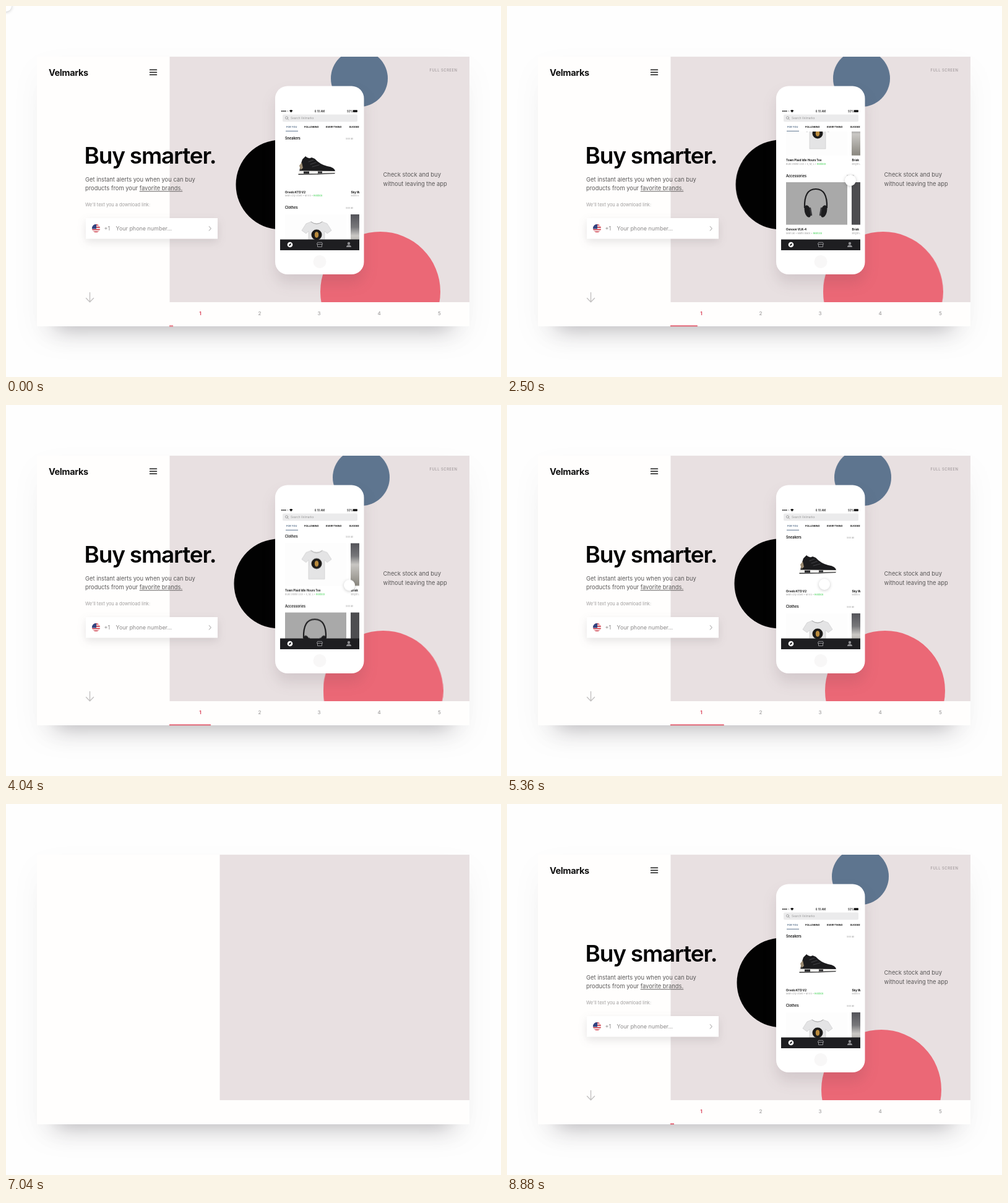
Write an HTML page that moves like this. It is 800 px wide and 600 px high and loops after 8.9 s.

```html
<!DOCTYPE html>
<html lang="en">
<head>
<meta charset="utf-8">
<title>Velmarks</title>
<style>
html, body { margin: 0; width: 100%; height: 100%; overflow: hidden; background: #fefefe; }
.card {
  position: absolute; left: 50px; top: 82px; width: 699px; height: 436px; background: #fffefd;
  box-shadow: 0 34px 34px -30px rgba(50, 45, 55, .34), 0 20px 50px rgba(60, 55, 60, .04);
}
svg { position: absolute; left: 0; top: 0; width: 800px; height: 600px; }
text { font-family: Inter, "Open Sans", sans-serif; fill: #111; white-space: pre; }

/* Shared 8.9 s loop; --d staggers the entrances, --dy sets their travel. */
.stage, .panel, .bar, .drift, .pop, .early, .late, .scroll, .touch {
  animation: 8.9s linear var(--d, 0s) infinite;
}
.stage { animation-name: stage; }
.panel { animation-name: panel; transform-origin: 749px 0; }
.bar { animation-name: bar; transform-origin: 264px 0; }
.drift { animation-name: drift; }
.pop { animation-name: pop; transform-box: fill-box; transform-origin: center; }
.early { animation-name: early; }
.late { animation-name: late; }
.scroll { animation-name: scroll; }
.touch { animation-name: touch; }
.scroll, .touch { animation-timing-function: cubic-bezier(.37, 0, .63, 1); }

@keyframes stage {
  0%, 60.5% { opacity: 1; }
  68.3%, 74.5% { opacity: 0; }
  74.6%, 100% { opacity: 1; }
}
@keyframes panel {
  0%, 68.4% { transform: none; }
  68.5% { transform: scaleX(0); }
  74.6% { transform: scaleX(0); animation-timing-function: cubic-bezier(.215, .61, .355, 1); }
  84.8%, 100% { transform: none; }
}
@keyframes bar {
  0% { transform: scaleX(.063); }
  68.3% { transform: scaleX(.975); }
  68.4%, 95.4% { transform: scaleX(0); }
  100% { transform: scaleX(.063); }
}
@keyframes drift {
  0% { transform: none; }
  68.4% { transform: translateX(var(--dx)); }
  68.5%, 100% { transform: none; }
}
@keyframes pop {
  0%, 68.4% { transform: none; }
  68.5% { transform: scale(0); }
  80.5% { transform: scale(0); animation-timing-function: cubic-bezier(.2, .7, .2, 1); }
  89.5%, 100% { transform: none; }
}
@keyframes early {
  0%, 68.4% { transform: none; opacity: 1; }
  68.5% { transform: translateY(var(--dy, 12px)); opacity: 0; }
  80.9% { transform: translateY(var(--dy, 12px)); opacity: 0; animation-timing-function: cubic-bezier(.215, .61, .355, 1); }
  88%, 100% { transform: none; opacity: 1; }
}
@keyframes late {
  0%, 68.4% { transform: none; opacity: 1; }
  68.5% { transform: translateY(var(--dy, 4px)); opacity: 0; }
  87.6% { transform: translateY(var(--dy, 4px)); opacity: 0; animation-timing-function: cubic-bezier(.215, .61, .355, 1); }
  94.4%, 100% { transform: none; opacity: 1; }
}
@keyframes scroll {
  0%, 6.74% { transform: translateY(0); }
  15.2%, 22.47% { transform: translateY(-112px); }
  30.73%, 38.2% { transform: translateY(-224px); }
  49.33%, 100% { transform: translateY(0); }
}
@keyframes touch {
  0%, 5.6% { transform: translate(555px, 372px); opacity: 0; }
  6.74% { transform: translate(555px, 372px); opacity: 1; }
  15.2% { transform: translate(555px, 260px); opacity: 1; }
  16.3% { transform: translate(555px, 260px); opacity: 0; }
  21.35% { transform: translate(555px, 334px); opacity: 0; }
  22.47% { transform: translate(555px, 334px); opacity: 1; }
  30.73% { transform: translate(555px, 222px); opacity: 1; }
  31.8% { transform: translate(555px, 222px); opacity: 0; }
  37.08% { transform: translate(555px, 245px); opacity: 0; }
  38.2% { transform: translate(555px, 245px); opacity: 1; }
  49.33% { transform: translate(555px, 339px); opacity: 1; }
  50.4% { transform: translate(555px, 339px); opacity: 0; }
  54.5% { transform: translate(545px, 325px); opacity: 0; }
  58.5%, 66% { transform: translate(513px, 290px); opacity: 1; }
  68.4%, 100% { transform: translate(513px, 290px); opacity: 0; }
}

.logo { font-size: 14.5px; font-weight: 700; letter-spacing: -.4px; }
.title { font-size: 37px; font-weight: 600; letter-spacing: -1.2px; fill: #050505; }
.copy text { font-size: 9.4px; fill: #5b5959; }
.copy .link { text-decoration: underline; }
.hint { font-size: 7.35px; fill: #a09e9e; }
.field { font-size: 8.95px; fill: #8b8989; }
.small { font-size: 5.9px; letter-spacing: .5px; fill: #a39c9e; font-weight: 500; }
.nums text { font-size: 8px; font-weight: 500; fill: #a09e9e; text-anchor: middle; }
.nums .on { fill: #dc4a5f; font-weight: 700; }
.status text { font-size: 4.2px; font-weight: 500; }
.search { font-size: 4.7px; fill: #999; }
.tabs text { font-size: 3.9px; font-weight: 700; }
.tabs .on { fill: #5e758f; }
.head { font-size: 5.5px; font-weight: 600; }
.name { font-size: 4.6px; font-weight: 700; }
.all, .sub { font-size: 3.8px; fill: #9d9d9d; }
.sub .new { fill: #35d04a; }
.shadow { filter: drop-shadow(0 14px 11px rgba(70, 50, 60, .13)); }
.lift { filter: drop-shadow(0 5px 7px rgba(60, 55, 60, .13)); }
.knob { filter: drop-shadow(0 1.5px 2.5px rgba(0, 0, 0, .22)); }
.line { fill: none; stroke-linecap: round; stroke-linejoin: round; }
</style>
</head>
<body>
<div class="card"></div>
<svg viewBox="0 0 800 600">
  <defs>
    <clipPath id="area"><rect x="264.5" y="82" width="484.5" height="397"/></clipPath>
    <clipPath id="screen"><rect x="443" y="165" width="128" height="230"/></clipPath>
    <clipPath id="feed"><rect x="443" y="203.5" width="128" height="174.5"/></clipPath>
    <clipPath id="round"><circle cx="145.5" cy="359.7" r="6.6"/></clipPath>
    <linearGradient id="coat" x2="0" y2="1">
      <stop stop-color="#54545a"/><stop offset=".3" stop-color="#77777a"/>
      <stop offset=".5" stop-color="#c9c7c4"/><stop offset="1" stop-color="#8a877f"/>
    </linearGradient>
  </defs>

  <g class="stage">
    <rect class="panel" x="264.5" y="82" width="484.5" height="397" fill="#e8e0e1"/>

    <g clip-path="url(#area)">
      <g class="drift" style="--dx:4.6px"><circle class="pop" cx="571" cy="117" r="46" fill="#5e758f"/></g>
      <g class="drift" style="--dx:-4.6px"><circle class="pop" style="--d:.1s" cx="444" cy="289" r="72.5" fill="#020202"/></g>
      <g class="drift" style="--dx:6.8px"><circle class="pop" style="--d:.2s" cx="605" cy="462" r="97" fill="#eb6876"/></g>
    </g>

    <g class="early" style="--d:.15s;--dy:36px">
      <rect class="shadow" x="435" y="129.5" width="143.5" height="304.5" rx="20" fill="#fff"/>
      <circle cx="507" cy="413.5" r="10.5" fill="#f8f7f7"/>
      <g clip-path="url(#screen)">
        <g class="status">
          <g fill="#111">
            <circle cx="446" cy="170" r="1"/><circle cx="448.6" cy="170" r="1"/><circle cx="451.2" cy="170" r="1"/>
            <path d="M458 169.2q2.7-2.4 5.4 0l-2.7 3z"/>
            <rect x="560.5" y="168.3" width="7.4" height="3.5" rx=".7"/>
          </g>
          <path class="line" d="M453.4 170h.1m2 0h.1" stroke="#aaa" stroke-width="1.6"/>
          <text x="507" y="171.6" text-anchor="middle">6:10 AM</text>
          <text x="551" y="171.6">92%</text>
        </g>
        <rect x="447" y="175.5" width="121" height="11.7" rx="2" fill="#ebebec"/>
        <g class="line" stroke="#888" stroke-width=".7"><circle cx="453.5" cy="180.8" r="2"/><path d="M455 182.4l1.6 1.6"/></g>
        <text class="search" x="460" y="183">Search Velmarks</text>
        <g class="tabs">
          <text class="on" x="453" y="197">FOR YOU</text><text x="482" y="197">FOLLOWING</text>
          <text x="517" y="197">EVERYTHING</text><text x="554.5" y="197">SUGGESTED</text>
        </g>
        <rect x="452" y="201.8" width="20" height="1" fill="#5e758f"/>

        <g clip-path="url(#feed)">
          <g class="scroll">
            <text class="head" x="451" y="216.3">Sneakers</text><text class="all" x="549" y="215.7">See all</text>
            <path d="M474 268q1-10 5-20l5-5q5 5 10 2l5 2q8 9 20 12 13 2 13 9z" fill="#1b1b1d"/>
            <path d="M474 258l4-5 2 9-4 3z" fill="#9b8b72"/>
            <path class="line" d="M489 252l8-3m-5 7l9-3m-6 7l11-3" stroke="#55555a" stroke-width=".7"/>
            <path d="M473 266.5l59 .5q2 2-1 3.5l-59 1z" fill="#f2f1ef"/>
            <path class="line" d="M473 272.2l30-.4 28-1.2" stroke="#333" stroke-width="1.4"/>
            <path d="M481 267.5h9v3.5h-9zm23 0h7v3h-7z" fill="#2a2a2c"/>
            <text class="name" x="451" y="302.7">Orvelo KTD V2</text><text class="name" x="557.5" y="302.7">Sky Wo</text>
            <text class="sub" x="451" y="308.4">Main City Store • M 9.5 • <tspan class="new">Restock</tspan></text>
            <text class="sub" x="557.5" y="308.4">Extra 5</text>

            <text class="head" x="451" y="328.4">Clothes</text><text class="all" x="549" y="327.8">See all</text>
            <rect x="451" y="337" width="99" height="68.7" fill="#fdfdfd"/>
            <rect x="557" y="337" width="30" height="68.7" fill="url(#coat)"/>
            <path d="M493 349q9 6 18 0l8 3 7 11-7 5-4-4v31h-26v-31l-4 4-7-5 7-11z" fill="#e4e4e5" stroke="#c6c6c8" stroke-width=".6"/>
            <path class="line" d="M493 349q9 7 18 0" stroke="#aaa" stroke-width="1"/>
            <circle cx="502" cy="370" r="8.5" fill="#1c1b1a"/>
            <ellipse cx="502" cy="370" rx="3.2" ry="4.8" fill="#b98a3c"/>
            <text class="name" x="451" y="415.2">Town Plaid Idle Hours Tee</text><text class="name" x="557.5" y="415.2">Brisk</text>
            <text class="sub" x="451" y="420.8">Bulk Online USA • S, M, L • <tspan class="new">Restock</tspan></text>
            <text class="sub" x="557.5" y="420.8">Bright L</text>

            <text class="head" x="451" y="440.9">Accessories</text><text class="all" x="549" y="440.3">See all</text>
            <rect x="451" y="449" width="99" height="68.7" fill="#a9a9a9"/>
            <rect x="557" y="449" width="30" height="68.7" fill="#4d4d50"/>
            <path class="line" d="M481 490q-1-30 18-30t18 30" stroke="#1d1d1f" stroke-width="2.2"/>
            <g fill="#1d1d1f">
              <ellipse cx="486" cy="496" rx="5" ry="10" transform="rotate(-14 486 496)"/>
              <ellipse cx="512" cy="496" rx="5" ry="10" transform="rotate(14 512 496)"/>
            </g>
            <path class="line" d="M490 491l2 11m16-11l-2 11" stroke="#3b3b3e" stroke-width="2.4"/>
            <text class="name" x="451" y="527">Oonoon VLK-4</text><text class="name" x="557.5" y="527">Brisk</text>
            <text class="sub" x="451" y="532.6">Main.uk • Matte black • <tspan class="new">Restock</tspan></text>
            <text class="sub" x="557.5" y="532.6">Bright L</text>

            <text class="head" x="451" y="552.6">Hats</text><text class="all" x="549" y="552">See all</text>
            <rect x="451" y="561" width="99" height="68.7" fill="#d9d9d9"/>
            <rect x="557" y="561" width="30" height="68.7" fill="#e5e5e5"/>
          </g>
        </g>

        <rect x="443" y="377.5" width="128" height="17.5" fill="#1e1e21"/>
        <circle cx="459" cy="386" r="4.3" fill="#fff"/>
        <path d="M461.2 383.8l-1.3 3.1-3.1 1.3 1.3-3.1z" fill="#1e1e21"/>
        <path class="line" d="M503.5 385.5v4h7v-4m-8-.5l1-2.7h7l1 2.7z" stroke="#8d8d90" stroke-width="1"/>
        <g fill="#8d8d90"><circle cx="554" cy="384" r="2.2"/><path d="M550 390q0-3.5 4-3.5t4 3.5z"/></g>
      </g>
      <g class="touch"><circle class="knob" r="9" fill="#fff"/></g>
    </g>

    <text class="logo early" x="69" y="112.5">Velmarks</text>
    <path class="early line" style="--d:.06s;--dy:6px" d="M232.5 103.3h11m-11 4h11m-11 4h11" stroke="#1b1b1b" stroke-width="1.5"/>
    <text class="small late" x="684.5" y="106.3">FULL SCREEN</text>

    <text class="title early" style="--d:.15s;--dy:18px" x="126.5" y="255">Buy smarter.</text>
    <g class="copy early" style="--d:.25s">
      <text x="128" y="283.7">Get instant alerts you when you can buy</text>
      <text x="128" y="298.3">products from your <tspan class="link">favorite brands.</tspan></text>
    </g>
    <text class="hint early" style="--d:.35s" x="128" y="323.5">We'll text you a download link:</text>
    <g class="copy early" style="--d:.45s">
      <text x="609.5" y="276">Check stock and buy</text>
      <text x="609.5" y="290.5">without leaving the app</text>
    </g>

    <g class="late" style="--d:.22s;--dy:10px">
      <rect class="lift" x="129" y="343" width="213" height="33.5" fill="#fff"/>
      <g clip-path="url(#round)">
        <rect x="138" y="353" width="15" height="14" fill="#f6f3f3"/>
        <path d="M138 354h15m-15 3.8h15m-15 3.8h15m-15 3.8h15" stroke="#d33f4d" stroke-width="1.9"/>
        <rect x="138" y="353" width="8" height="7.4" fill="#2f4583"/>
      </g>
      <text class="field" x="158.5" y="363">+1</text>
      <text class="field" x="177.5" y="363">Your phone number...</text>
      <path class="line" d="M328.3 356.5l3 3.4-3 3.4" stroke="#9a9898" stroke-width="1"/>
    </g>
    <path class="late line" style="--d:.1s" d="M135.5 463.5v15m-6-6l6 6.2 6-6.2" stroke="#c3c1c1" stroke-width="1.4"/>

    <g class="nums">
      <text class="late on" x="314" y="500">1</text>
      <text class="late" style="--d:.04s" x="410" y="500">2</text>
      <text class="late" style="--d:.08s" x="506" y="500">3</text>
      <text class="late" style="--d:.12s" x="603" y="500">4</text>
      <text class="late" style="--d:.16s" x="700.5" y="500">5</text>
    </g>
    <rect class="bar" x="264" y="516.5" width="100" height="1.8" fill="#e2596b"/>
  </g>
</svg>
</body>
</html>
```
